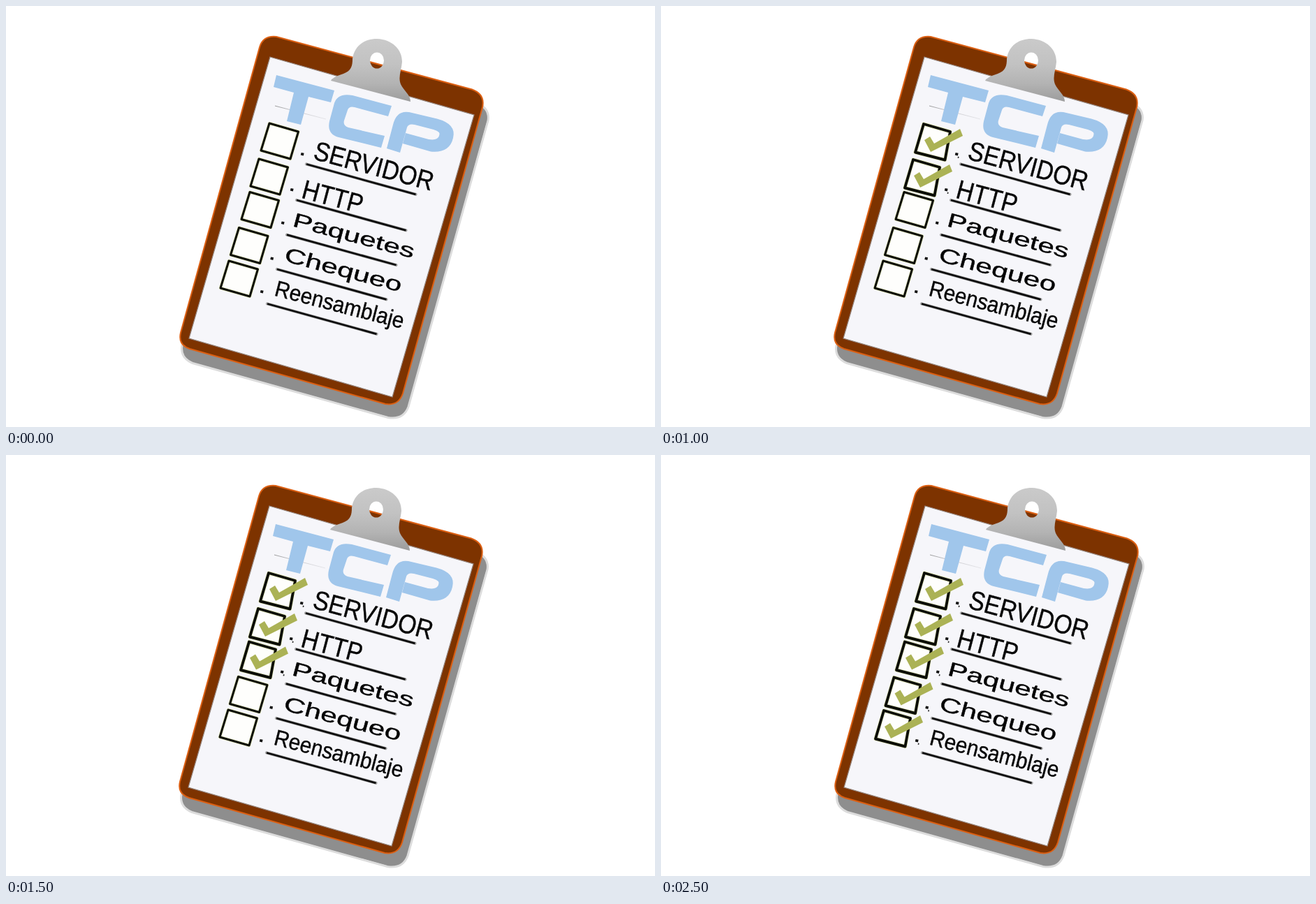
Animation of 929x603 px, one loop 3 s. Source, as an HTML page:

```html
<!DOCTYPE html>
<html lang="es">
<head>
<meta charset="utf-8">
<title>TCP checklist</title>
<style>
html, body { margin: 0; width: 100%; height: 100%; overflow: hidden; background: #fff; }
svg { display: block; width: 929px; height: 603px; }
text { font-family: "Liberation Sans", Arial, sans-serif; fill: #050505; stroke: #050505; stroke-width: .35px; }
</style>
</head>
<body>
<svg viewBox="0 0 929 603">
  <defs>
    <linearGradient id="metal" x1="0" y1="0" x2="0" y2="1">
      <stop offset="0" stop-color="#cacaca"/>
      <stop offset=".4" stop-color="#c2c2c2"/>
      <stop offset=".7" stop-color="#b4b4b4"/>
      <stop offset="1" stop-color="#9c9c9c"/>
    </linearGradient>
    <linearGradient id="fade" gradientUnits="userSpaceOnUse" x1="385" y1="143" x2="458" y2="162">
      <stop offset="0" stop-color="#999"/>
      <stop offset=".3" stop-color="#c4c4c8"/>
      <stop offset="1" stop-color="#e6e6ea"/>
    </linearGradient>
  </defs>
  <g id="board">
    <path d="M672 138Q693 146 690 164L576 574Q569 593 547 589.5L267 511.5Q249 504 252 486Z" fill="#8e8e8e" stroke="#dcdcdc" stroke-width="3"/>
    <path d="M672 140Q690 148 688 164L574 572Q567 590 547 587.5L268 509.5Q252 503 254 487Z" fill="#8e8e8e"/>
    <path d="M363 59Q368 42 387 44L667 119.5Q686 126.500 682 145L568 555Q562 573 543 570L263 491Q246 485 250 468Z" fill="#7d3300" stroke="#dc5f12" stroke-width="2"/>
    <path d="M378 73L670 156L553 560L262 476Z" fill="#f6f6fa" stroke="#97877f" stroke-width="1.2"/>
    <path d="M385 143L458 162" stroke="url(#fade)"/>
    <g fill="#a0c6eb" role="img" aria-label="TCP">
      <path d="M387 99L470 121L465 138L433 130L422 170L402 165L412 124L383 116Z"/>
      <path d="M552 143L496 128Q475 124 470 139L463 165Q459 183 476 188L537 203L542 186L490 174Q482 171 484 164L489 149Q491 143 499 145L547 158Z"/>
      <path d="M545 204L554 170Q559 149 577 152L617 161.500Q645 169 640 189Q635 211 608 208.500L568 197L572 182L605 191Q618 193 620 186Q623 180 612 177L585 170Q576 168 574 174L564 210Z"/>
    </g>
    <path fill="url(#metal)" fill-rule="evenodd" d="M465 107Q467 102 483 97C494 93 496 86 496 76C498 58 512 47 531 47C553 48 567 62 567 80C566 92 561 102 565 112C569 121 579 127 579 137ZM531 66.500A10 11.500 0 1 0 531 89.500A10 11.500 0 1 0 531 66.500Z"/>
    <g id="rows"></g>
  </g>
</svg>
<script>
const STEP = 500, LOOP = 3000;
const board = document.getElementById("board");
const rows = document.getElementById("rows");

// box offset from the first row, text origin, size, scale and tilt, underline height
const items = [
  { word: "SERVIDOR", dx: 0, dy: 0, x: 438.5, y: 219, size: 33.8, sx: 1, sy: 1.13, tilt: 15, line: 226.5 },
  { word: "HTTP", dx: -15, dy: 51, x: 421.5, y: 274.5, size: 34, sx: 1, sy: 1.13, tilt: 14.8, line: 278 },
  { word: "Paquetes", dx: -28, dy: 98.5, x: 409, y: 315, size: 27, sx: 1.57, sy: 1.05, tilt: 15, line: 327.7 },
  { word: "Chequeo", dx: -43.5, dy: 149.5, x: 397, y: 365, size: 28, sx: 1.52, sy: 1.04, tilt: 15, line: 377 },
  { word: "Reensamblaje", dx: -58, dy: 197, x: 383, y: 414.5, size: 29.7, sx: 1, sy: 1.08, tilt: 14.5, line: 426.5 }
];

const path = (d, look) => `<path d="${d}" ${look}/>`;

function box(d, width) {
  return path(d, `fill="#fefefc" stroke="#e9edc8" stroke-width="${width + 1.6}" stroke-linejoin="round"`) +
    path(d, `fill="none" stroke="#0c0e06" stroke-width="${width}" stroke-linejoin="round"`);
}

rows.innerHTML = items.map((it, i) => {
  const line = `M${430 - 14 * i} ${it.line}l156.5 43.3`;
  return `<g transform="translate(${it.dx} ${it.dy})">
    <g class="open">${box("M377 168L418.500 180L407 219L365 207Z", 3)}</g>
    <g class="done">${box("M377 169L415 180L407.500 220.500L365 209.500Z", 3.9)}
      ${path("M378 192L386 187L392 197L429 176L433 186L387 209Z", 'fill="#abb255"')}
      ${path("M426 215.500l1.600 .4l-.5 2.200l-1.500-.4z", 'fill="#222"')}</g>
    ${path("M422.600 210l4 .8l-.8 3.600l-4-.8z", 'fill="#111"')}
  </g>` +
    path(line, 'stroke="#a5a5a5" stroke-width="4.2" stroke-linecap="round"') +
    path(line, 'stroke="#0c0c0c" stroke-width="2.8"') +
    `<text transform="translate(${it.x} ${it.y}) rotate(${it.tilt}) scale(${it.sx} ${it.sy})" font-size="${it.size}">${it.word}</text>`;
}).join("");

const open = rows.querySelectorAll(".open");
const done = rows.querySelectorAll(".done");

function draw(time) {
  const count = Math.floor((time % LOOP) / STEP);
  const nudge = count >= 1 && count <= 3 ? -1 : 0;
  board.setAttribute("transform", `translate(${nudge} 0)`);
  items.forEach((_, i) => {
    const ticked = i < count;
    open[i].style.display = ticked ? "none" : "";
    done[i].style.display = ticked ? "" : "none";
  });
}

function loop() {
  draw(performance.now());
  requestAnimationFrame(loop);
}
loop();
</script>
</body>
</html>
```
